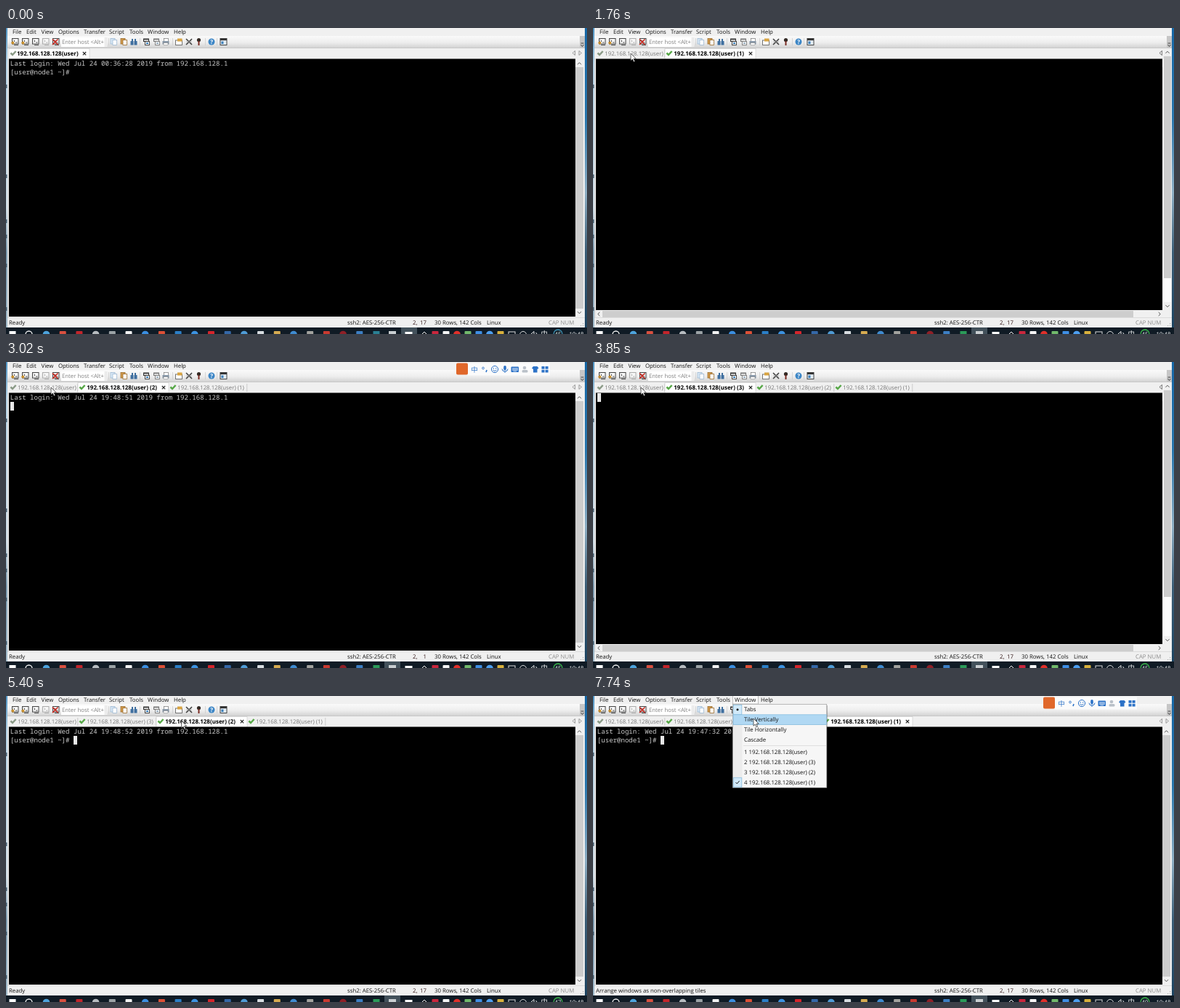
An HTML page that plays this animation: 800 px wide and 422 px high, repeating every 8000 ms.

```html
<!DOCTYPE html>
<html lang="en">
<head>
<meta charset="utf-8">
<title>Terminal tabs</title>
<style>
html, body { margin: 0; width: 100%; height: 100%; overflow: hidden; background: #000; }
svg { display: block; width: 100vw; height: 100vh; }
text { font: 7.8px "Open Sans", "Noto Sans", sans-serif; white-space: pre; text-rendering: geometricPrecision; }
.bold { font-weight: 700; font-size: 8px; }
.term { font: 9.09px "Noto Sans Mono", "DejaVu Sans Mono", monospace; fill: #c8c8c8; }
.cjk { font-family: "Noto Sans CJK SC", "Noto Sans CJK", sans-serif; font-size: 9.5px; }
</style>
</head>
<body>
<svg viewBox="0 0 800 422" preserveAspectRatio="none">
  <defs>
    <linearGradient id="tool" x2="0" y2="1"><stop stop-color="#fafafa"/><stop offset=".55" stop-color="#ededed"/><stop offset="1" stop-color="#d2d2d2"/></linearGradient>
    <linearGradient id="left" x2="0" y2="1"><stop stop-color="#4f94c4"/><stop offset=".12" stop-color="#b4d2e6"/><stop offset=".6" stop-color="#cfdde6"/><stop offset=".75" stop-color="#7d9bb0"/><stop offset="1" stop-color="#a3bccc"/></linearGradient>
    <linearGradient id="right" x2="0" y2="1"><stop stop-color="#1767a5"/><stop offset=".3" stop-color="#2b78ae"/><stop offset=".55" stop-color="#8fafc4"/><stop offset=".75" stop-color="#3d5f78"/><stop offset="1" stop-color="#1e4562"/></linearGradient>
  </defs>
  <g id="frame"></g>
  <g id="tabs"></g>
  <g id="view"></g>
  <g id="status"></g>
  <g id="task"></g>
  <g id="ime"></g>
  <g id="menu"></g>
  <g id="arrow"><path d="M0 0V10.2L2.4 8L4.1 11.8L5.7 11L4 7.4H7.2Z" fill="#fff" stroke="#222" stroke-width=".7"/></g>
  <g id="beam"><path d="M-2 -5H2M0 -5V5M-2 5H2" fill="none" stroke="#ddd" stroke-width=".8"/></g>
</svg>
<script>
const LOOP = 8000, HOST = '192.168.128.128(user)', BLUE = '#2c72c7';
const $ = id => document.getElementById(id);
const rect = (x, y, w, h, fill, more = '') => `<rect x="${x}" y="${y}" width="${w}" height="${h}" fill="${fill}" ${more}/>`;
const circle = (x, y, r, fill, more = '') => `<circle cx="${x}" cy="${y}" r="${r}" fill="${fill}" ${more}/>`;
const line = (d, stroke, w = 1, fill = 'none') => `<path d="${d}" stroke="${stroke}" stroke-width="${w}" fill="${fill}"/>`;
const label = (x, y, s, fill = '#111', cls = '', more = '') =>
  `<text x="${x}" y="${y}" fill="${fill}" class="${cls}" ${more}>${s.replace(/</g, '&lt;')}</text>`;

// Toolbar pictograms, each centred on x at y 19
const session = (x, ink, accent) => rect(x - 3.5, 14.5, 8.5, 7.5, '#f6f6f6', `stroke="${ink}" stroke-width="1"`) +
  line(`M${x - 1.5} 16.5L${x} 18L${x - 1.5} 19.5M${x + 1} 20H${x + 3.5}M${x - 1} 23.5H${x + 5}`, ink, .9) +
  (accent ? line(`M${x - 5} 20.5H${x - 1.5}M${x - 3.2} 18.6L${x - 1.3} 20.5L${x - 3.2} 22.4`, accent, 1.5) : '');
const screen = (x, bar, body) => rect(x - 4, 14.5, 8, 4.5, bar) + rect(x - 3, 16.3, 6, 1.5, '#fff') +
  rect(x - 1.5, 18.5, 6, 5, '#fff', `stroke="${bar}" stroke-width=".9"`) + rect(x, 20, 3, 2, body);
const page = (x, fill, edge) => rect(x - 4, 14.5, 6, 7.5, fill, `stroke="${edge}" stroke-width=".8"`) +
  rect(x - 1, 16.5, 5.5, 7, '#fff', `stroke="${edge}" stroke-width=".8"`);
const printer = x => rect(x - 2.5, 14.5, 6, 4, '#fff', 'stroke="#777" stroke-width=".7"') +
  rect(x - 4.5, 18, 9, 4.5, '#8797a8') + rect(x - 3, 20.5, 6, 3, '#fff', 'stroke="#777" stroke-width=".5"');

function toolbar() {
  return session(12, '#444', '#d2962e') + session(26, '#444', '#d2962e') + session(40, '#444') +
    session(54, '#aaa') + session(68, '#444') + line('M64 15.5L71.5 23M71.5 15.5L64 23', '#c9261d', 1.6) +
    rect(76, 13, 60, 13, '#fff') + label(77, 21.7, 'Enter host <Alt+', '#808080') + rect(135.5, 13, 4, 13, '#ececec') +
    page(148, '#d9e8f6', '#9db9d3') + page(162, '#d29b4c', '#9b6b2b') +
    rect(171.5, 18, 4, 5.5, '#3f6f9f') + rect(176.5, 18, 4, 5.5, '#3f6f9f') + rect(173, 15, 2, 4, '#3f6f9f') + rect(177, 15, 2, 4, '#3f6f9f') +
    screen(193, '#333', '#3c7fb8') + screen(207, '#777', '#9db0c0') + printer(220) +
    rect(233.5, 17, 9, 6.5, '#fff', 'stroke="#666" stroke-width=".9"') + rect(236, 14.5, 6.5, 4, '#d9a441') +
    line('M248 15L256 23M256 15L248 23', '#444', 1.6) + line('M248 19H256', '#aaa', .8) +
    circle(265.5, 16.5, 2.6, '#332a25') + rect(264.5, 18, 2, 6, '#7b2d24') +
    circle(283, 19, 4.5, '#3c86c6') + label(281.2, 21.8, '?', '#fff', 'bold') +
    rect(295, 14.5, 9, 9, '#e4edf5', 'stroke="#333" stroke-width=".9"') + rect(295, 14.5, 9, 2.6, '#333') + rect(296.5, 18.5, 3, 3.5, '#3c7fb8') +
    [141, 184, 229, 274, 290].map(x => rect(x, 14, .6, 10, '#c4c4c4')).join('');
}

const MENU = [['File', 9], ['Edit', 28], ['View', 48.5], ['Options', 72], ['Transfer', 107], ['Script', 142], ['Tools', 170], ['Window', 195], ['Help', 231]];
const menuText = MENU.map(([s, x]) => label(x, 7.6, s)).join('');

$('frame').innerHTML = rect(0, 0, 2, 413, 'url(#left)') + rect(797, 0, 3, 413, 'url(#right)') +
  [78, 202, 264, 285, 325, 385].map(y => rect(0, y, 1.5, 5, '#4d6576')).join('') +
  rect(2, 0, 795, 413, '#f0f0f0') + rect(2, 11, 795, 16.5, 'url(#tool)') +
  rect(790, 11, 7, 16.5, '#c6c6c6') + line('M791.5 21H795.5M791.5 23L793.5 25.5L795.5 23', '#222', .8) +
  toolbar() + rect(2, 27, 795, 1, '#c8c8c8');

// Tab strip, terminal and scroll bars
const tick = (x, fill) => line(`M${x - 3.6} 34.5L${x - 1} 37L${x + 3.6} 32`, fill, 2.5);

function tabStrip(names, active) {
  let x = 4, out = rect(2, 28, 795, 15, '#f0f0f0');
  names.forEach((n, i) => {
    const on = i === active, w = n ? (on ? 125 : 108) : (on ? 111 : 95);
    if (on) out += rect(x, 28.5, w, 14.5, '#fff', 'stroke="#c8c8c8" stroke-width=".6"');
    else out += rect(x + w - .5, 30, .7, 11, '#bbb');
    out += tick(x + 6, n ? '#58a848' : '#8a9a86');
    out += label(x + (on && !n ? 11 : 12.3), 37.6, HOST + (n && ` (${n})`), on ? '#000' : '#777', on ? 'bold' : '');
    if (on) { const c = x + w - 7; out += line(`M${c - 2.2} 33L${c + 2.2} 37.4M${c + 2.2} 33L${c - 2.2} 37.4`, '#222', 1.1); }
    x += w;
  });
  return out + line('M783.5 31.5V37.5L780 34.5Z', '#777', .7) + line('M789 31.5V37.5L792.5 34.5Z', '#777', .7);
}

const chevron = (x, y, dx, dy) => dx
  ? line(`M${x - dx} ${y - 2.5}L${x + dx} ${y}L${x - dx} ${y + 2.5}`, '#555', 1)
  : line(`M${x - 2.5} ${y - dy}L${x} ${y + dy}L${x + 2.5} ${y - dy}`, '#555', 1);

function terminal(s) {
  let out = rect(2, 42, 2, 357, '#e3e3e3') + rect(4, 42.5, 780, 355.5, '#000');
  if (s.busy) {
    out += rect(4, 389, 793, 10, '#f0f0f0') + rect(13, 390, 731, 9, '#cdcdcd') +
      chevron(8, 394.5, -1.3) + chevron(780, 394.5, 1.3) +
      rect(784, 28, 13, 361, '#f0f0f0') + rect(786, 39, 10, s.busy - 39, '#cdcdcd') + rect(786, s.busy, 10, 378 - s.busy, '#fbfbfb') +
      rect(784, 43, 1.5, 11, '#fff') + chevron(791, 33.5, 0, -1.3) + chevron(791, 383.5, 0, 1.3) +
      line('M783.5 31.5V37.5L780 34.5Z', '#777', .7);
  } else {
    out += rect(784, 43, 13, 356, '#f0f0f0') + rect(784, 54, 11, 333, '#cdcdcd') +
      chevron(789.5, 49, 0, -1.3) + chevron(789.5, 392.5, 0, 1.3);
  }
  if (s.login) out += label(5.8, 52.3, `Last login: Wed Jul 24 ${s.login} 2019 from 192.168.128.1`, '', 'term');
  if (s.prompt) out += label(5.8, 64.3, '[user@node1 ~]#', '', 'term');
  if (s.caret) out += rect(s.prompt ? 93 : 6, s.login ? 55 : 43, 5, 12, '#e8e8e8');
  return out;
}

function statusBar(msg, col) {
  return rect(2, 399, 795, 14, '#f0f0f0') + rect(2, 399, 795, 1, '#dcdcdc') +
    label(4, 409.4, msg) + label(470, 409.4, 'ssh2: AES-256-CTR') +
    label(560, 409.4, '2,', '#301414') + label(579, 409.4, col, '#301414', '', 'text-anchor="end"') +
    label(590, 409.4, '30 Rows, 142 Cols') + label(662, 409.4, 'Linux') + label(747, 409.4, 'CAP NUM', '#8c8c8c') +
    [[794, 410], [791, 410], [794, 407]].map(([x, y]) => rect(x, y, 1.3, 1.3, '#b5b5b5')).join('');
}

// Evenly spaced launcher and tray marks, cropped by the stage edge
const APPS = '#4da3dc #d9503f #c3252b #b7bcc0 #9ca3a6 #f2f2f2 #3b8ee0 #dd5036 #2b7fc7 #3c92e0 #d5252b #3568a8 #4f9bd5 #d8dde1 #d6ab51 #3f8bd0 #a3a39f #c93a30 #8f2027 #3d7fc4'.split(' ');
const TRAY = '#c9273d #f4f4f4 #e0302a #71b96b #3f8fe5 #4d9ff0 #d8b13c'.split(' ');

function taskbar(focus, count) {
  const mark = (c, x, i) => i % 3 ? rect(x - 4.5, 418, 9, 6, c, 'rx="1"') : circle(x, 422.5, 4.8, c);
  return rect(0, 413, 800, 9, '#101b25') + rect(focus ? 521 : 544, 413, 22, 9, '#43515b') +
    rect(4.5, 418, 9, 6, '#fff') + circle(31.5, 422.5, 4.5, 'none', 'stroke="#f4f4f4" stroke-width="1.3"') +
    APPS.map((c, i) => mark(c, 55.5 + i * 22.7, i)).join('') +
    rect(505.5, 418, 9, 6, focus ? '#2b9a59' : '#2a8094') +
    rect(527, 418, 10, 6, '#c9ced1') + rect(549.5, 419, 10, 5, '#fff') +
    line('M573 422L576 419L579 422', '#fff', 1) +
    TRAY.map((c, i) => mark(c, 591 + i * 15, i + 1)).join('') +
    rect(692, 419, 9, 4, 'none', 'stroke="#ddd" stroke-width="1"') +
    circle(712, 423, 4.5, 'none', 'stroke="#ddd" stroke-width="1"') + line('M723 422L727 418.5V424M729.5 420L731 422', '#eee', 1) +
    label(736.5, 425, '中', '#fff', 'cjk') +
    circle(760, 422, 6, '#16232d', `stroke="${focus ? '#39b54a' : '#3c8fb0'}" stroke-width="1.3"`) +
    label(760, 424.5, String(count), '#e8f4ea', '', 'text-anchor="middle"') + label(775.5, 424.5, '19:48', '#fff');
}

$('ime').innerHTML = rect(636, 1.5, 113, 17, '#fbfbfb') + rect(620, 1.5, 16, 16, '#e0672a', 'rx="2"') +
  label(640.3, 13.5, '中', BLUE, 'cjk') + circle(657, 8.5, 1.4, 'none', `stroke="${BLUE}" stroke-width=".9"`) + line('M662 11L661 14', BLUE, 1.6) +
  circle(673, 10, 4.6, 'none', `stroke="${BLUE}" stroke-width="1"`) + circle(671.3, 8.8, .7, BLUE) + circle(674.7, 8.8, .7, BLUE) + line('M670.4 11Q673 14 675.6 11', BLUE, .9) +
  rect(685.2, 5, 3.6, 6.5, BLUE, 'rx="1.8"') + line('M683 9.5Q683 13 687 13Q691 13 691 9.5M687 13V15', BLUE, 1) +
  rect(695.5, 6.5, 10.5, 7.5, BLUE, 'rx="1"') + line('M697 9H705M697 11H705', '#fff', .9) + line('M698.5 12.8H703', '#fff', .7) +
  circle(714, 8, 2.3, '#b9c0c8') + rect(710.5, 11, 8, 3.5, '#b9c0c8', 'rx="1.5"') +
  `<path d="M726 6H731.5L733.5 8.5L731.5 10V14.5H726V10L724 8.5Z" fill="${BLUE}"/>` +
  rect(737.5, 6, 4, 3.7, BLUE) + rect(742.6, 6, 4, 3.7, BLUE) + rect(737.5, 10.8, 4, 3.7, BLUE) + rect(742.6, 10.8, 4, 3.7, BLUE);

function menuLayer(open, hot) {
  if (!open) return (hot ? rect(193, 0, 34, 10.5, '#bfe1f7') : '') + menuText;
  const items = ['Tabs', 'Tile Vertically', 'Tile Horizontally', 'Cascade']
    .concat(['', ' (3)', ' (2)', ' (1)'].map((n, i) => `${i + 1} ${HOST}${n}`));
  const edge = 'stroke="#7fb8dc" stroke-width=".7"';
  return rect(192.4, -1, 35, 12, '#fafafa', 'stroke="#a8a8a8" stroke-width=".7"') + menuText +
    rect(194, 13, 129, 115, '#000', 'opacity=".25"') +
    rect(192.4, 11.3, 129.4, 115, '#f6f6f6', 'stroke="#9c9c9c" stroke-width=".7"') + rect(193, 12, 12.5, 114, '#ececec') +
    (hot >= 0 ? rect(193, 11.8 + hot * 14, 128.4, 13.8, '#b0d8f3', edge) : '') +
    rect(193.3, 12.3, 11.5, 13, '#d2eafa', edge) + circle(199, 18.7, 1.5, '#111') +
    rect(193.3, 112.8, 11.5, 13, '#d2eafa', edge) + line('M196.5 119L198.3 121L201.6 117', '#222', 1) +
    rect(207, 68.3, 114, .6, '#d0d0d0') +
    items.map((s, i) => label(208, 21.4 + i * 14 + (i > 3 ? 2.6 : 0), s)).join('');
}

// Scene changes: each entry overrides the state from its time on
const CUES = [
  [0, { names: [''], active: 0, busy: 0, login: '00:36:28', prompt: 1, caret: 0, ime: 0, focus: 0, count: 45, col: '17', open: 0, hot: 0, msg: 'Ready' }],
  [1290, { focus: 1, caret: 1 }],
  [1380, { ime: 1 }],
  [1640, { names: ['', '1'], active: 1, busy: 345, login: '', prompt: 0, caret: 0, ime: 0 }],
  [1910, { busy: 0, login: '19:47:32', prompt: 1, caret: 1, ime: 1 }],
  [2780, { names: ['', '2', '1'], busy: 335, login: '', prompt: 0, ime: 0 }],
  [2950, { busy: 0, login: '19:48:51', ime: 1, col: '1' }],
  [3150, { prompt: 1, col: '17' }],
  [3640, { names: ['', '3', '2', '1'], busy: 324, login: '', prompt: 0, ime: 0 }],
  [3990, { busy: 0, login: '19:48:52', ime: 1, col: '1' }],
  [4120, { prompt: 1, col: '17' }],
  [4650, { caret: 0, count: 46 }],
  [5180, { caret: 1, count: 47 }],
  [5400, { active: 2, ime: 0 }],
  [5490, { login: '19:48:51', ime: 1 }],
  [5960, { count: 49 }],
  [6130, { active: 3, ime: 0 }],
  [6200, { login: '19:47:32' }],
  [6270, { ime: 1 }],
  [6500, { hot: 1 }],
  [6800, { open: 1, hot: -1 }],
  [7100, { caret: 0 }],
  [7400, { hot: 0 }],
  [7590, { hot: 1, msg: 'Arrange windows as non-overlapping tiles' }],
  [7630, { caret: 1 }]
];

// Pointer moves: start, end, steps, target x, target y
const MOVES = [
  [150, 830, 10, 51, 34.5], [1640, 1700, 1, 52, 35], [2310, 2380, 2, 62, 35], [3470, 3540, 2, 66, 35],
  [4060, 4250, 3, 179, 37], [4340, 4400, 1, 268, 48], [4560, 5340, 11, 241.5, 34],
  [5800, 6030, 4, 335, 34.5], [6200, 6500, 5, 202.5, 3.5], [7270, 7740, 7, 221, 31]
];

function pointer(t) {
  let x = 552, y = 334;
  for (const [a, b, n, tx, ty] of MOVES) {
    if (t < a) break;
    const k = Math.min(n, Math.floor((t - a) / (b - a) * (n - 1) + 1e-6) + 1) / n;
    x += (tx - x) * k;
    y += (ty - y) * k;
  }
  return [x, y];
}

const shown = {};
function put(id, html) {
  if (shown[id] !== html) $(id).innerHTML = shown[id] = html;
}

function draw(t) {
  const s = {};
  for (const [at, change] of CUES) if (t >= at) Object.assign(s, change);
  put('tabs', tabStrip(s.names, s.active));
  put('view', terminal(s));
  put('status', statusBar(s.msg, s.col));
  put('task', taskbar(s.focus, s.count));
  put('menu', menuLayer(s.open, s.hot));
  $('ime').style.display = s.ime ? '' : 'none';
  const [x, y] = pointer(t), inside = y > 43 && !s.open;
  for (const [id, on] of [['arrow', !inside], ['beam', inside]]) {
    $(id).setAttribute('transform', `translate(${x} ${y})`);
    $(id).style.display = on && t >= 150 ? '' : 'none';
  }
}

const start = performance.now();
function tickFrame() {
  draw((performance.now() - start) % LOOP);
  requestAnimationFrame(tickFrame);
}
tickFrame();
</script>
</body>
</html>
```
